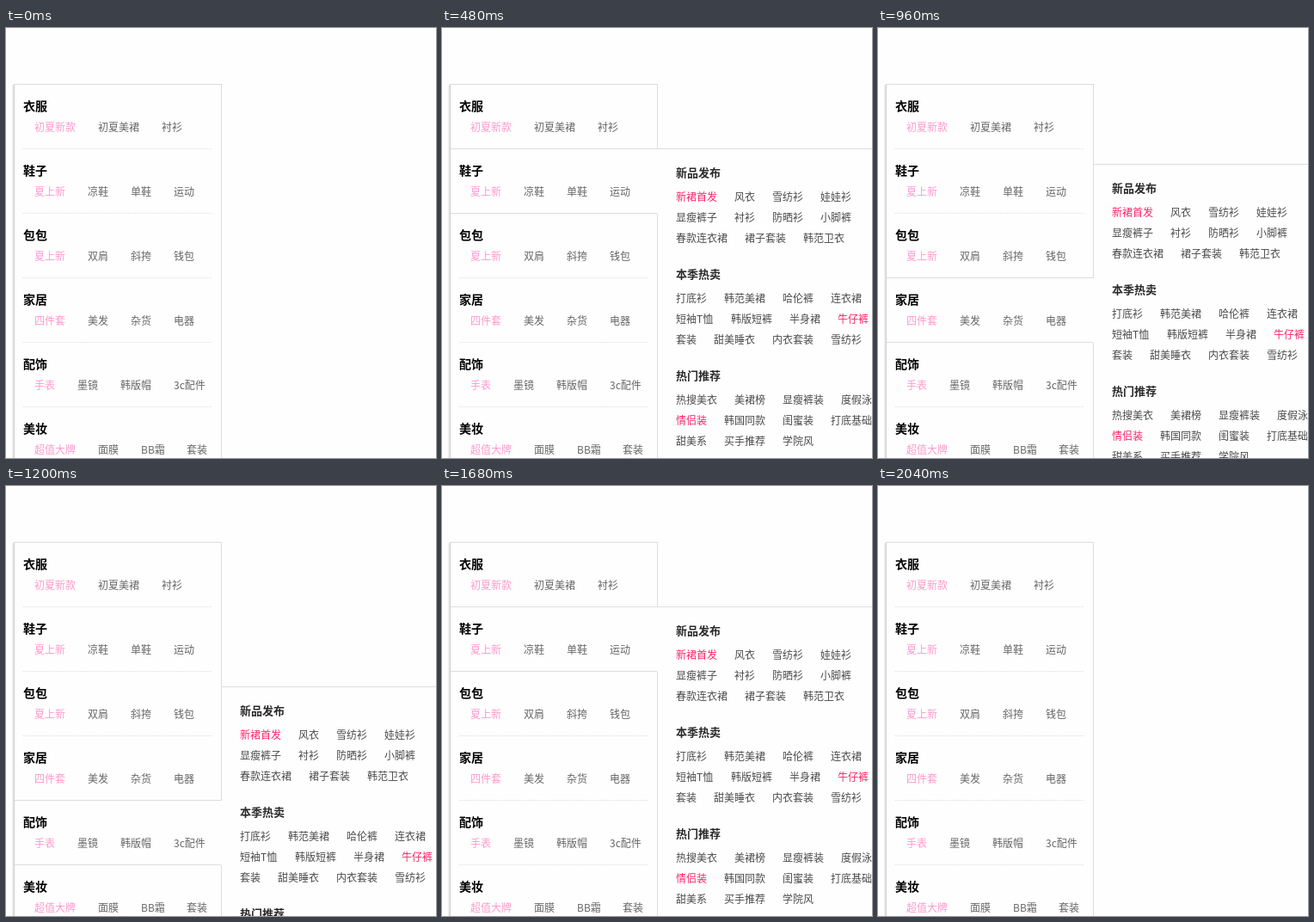
An HTML page for the animation above (2.58 s loop, 500x500 px).

```html
<!DOCTYPE html>
<html lang="zh-CN">
<head>
<meta charset="utf-8">
<title>分类菜单</title>
<style>
  html, body { margin: 0; width: 100%; height: 100%; overflow: hidden; background: #fefefe; }
  svg { display: block; width: 100%; height: 100%; }
  text { font-family: "Noto Sans CJK SC", "Noto Sans CJK", "Noto Sans", sans-serif; font-size: 12px; fill: #666; }
  .head { font-size: 14px; font-weight: 700; fill: #000; }
  .new { fill: #f9c; }
  .link { fill: #4a4a4a; }
  .hot { fill: #ff2468; }
  .group { font-size: 13px; font-weight: 700; fill: #2a2a2a; }
  line { stroke: #ddd; shape-rendering: crispEdges; }
  .dots { stroke-dasharray: 1 1; }
</style>
</head>
<body>
<svg id="stage" viewBox="0 0 500 500"></svg>
<script>
const TOP = 65, ROW = 75, LEFT = 9, RIGHT = 250, PANEL_H = 401;

const menu = [
  ['衣服', '初夏新款 初夏美裙 衬衫'],
  ['鞋子', '夏上新 凉鞋 单鞋 运动'],
  ['包包', '夏上新 双肩 斜挎 钱包'],
  ['家居', '四件套 美发 杂货 电器'],
  ['配饰', '手表 墨镜 韩版帽 3c配件'],
  ['美妆', '超值大牌 面膜 BB霜 套装']
];

// A star marks a highlighted link.
const groups = [
  ['新品发布', '*新裙首发 风衣 雪纺衫 娃娃衫', '显瘦裤子 衬衫 防晒衫 小脚裤', '春款连衣裙 裙子套装 韩范卫衣'],
  ['本季热卖', '打底衫 韩范美裙 哈伦裤 连衣裙', '短袖T恤 韩版短裤 半身裙 *牛仔裤', '套装 甜美睡衣 内衣套装 雪纺衫'],
  ['热门推荐', '热搜美衣 美裙榜 显瘦裤装 度假泳衣', '*情侣装 韩国同款 闺蜜装 打底基础', '甜美系 买手推荐 学院风']
];

const panelTops = [65, 140, 83, 158, 233];

// [start in ms, hovered row], -1 for none
const hovers = [[0, -1], [120, 0], [480, 1], [720, 2], [960, 3], [1200, 4],
                [1500, 3], [1560, 2], [1680, 1], [1800, 0], [2040, -1]];
const LOOP = 2580;

const stage = document.getElementById('stage');

function add(parent, tag, attrs, content) {
  const el = document.createElementNS('http://www.w3.org/2000/svg', tag);
  for (const key in attrs) el.setAttribute(key, attrs[key]);
  if (content) el.textContent = content;
  parent.appendChild(el);
  return el;
}

const hLine = (parent, x1, x2, y, attrs) =>
  add(parent, 'line', { x1, x2, y1: y + 0.5, y2: y + 0.5, ...attrs });
const vLine = (parent, x, y1, y2, attrs) =>
  add(parent, 'line', { x1: x + 0.5, x2: x + 0.5, y1, y2, ...attrs });
const label = (parent, x, y, cls, str) => add(parent, 'text', { x, y, class: cls }, str);
const textWidth = str => [...str].reduce((w, c) => w + (c < '\u0100' ? 7.5 : 12), 0);

function linkRow(parent, x, y, gap, words, classOf) {
  words.split(' ').forEach((word, i) => {
    const str = word.replace('*', '');
    label(parent, Math.round(x), y, classOf(word, i), str);
    x += textWidth(str) + gap;
  });
}

// Left edge with its soft shadow
vLine(stage, LEFT - 2, TOP + 2, 500, { style: 'stroke:#eee' });
vLine(stage, LEFT - 1, TOP + 1, 500, { style: 'stroke:#e4e4e4' });
vLine(stage, LEFT, TOP, 500, { style: 'stroke:#d0d0d0' });
hLine(stage, LEFT, RIGHT + 1, TOP);

const rows = menu.map(([head, words], i) => {
  const y = TOP + i * ROW;
  label(stage, 20, y + 31, 'head', head);
  linkRow(stage, 33, y + 55, 26, words, (w, k) => k ? '' : 'new');
  return {
    edge: vLine(stage, RIGHT, y + 1, y + ROW + 1),
    dots: hLine(stage, 20, 240, y + ROW, { class: 'dots' })
  };
});

const frame = add(stage, 'g');
hLine(frame, LEFT + 1, RIGHT, 0);
hLine(frame, LEFT + 1, RIGHT, ROW);

const panel = add(stage, 'g');
hLine(panel, RIGHT, 500, 0);
hLine(panel, RIGHT, 500, PANEL_H);
groups.forEach(([title, ...lines], g) => {
  const y = g * 118;
  label(panel, 272, y + 33, 'group', title);
  lines.forEach((words, i) =>
    linkRow(panel, 272, y + 61 + i * 24, 20, words, w => w[0] === '*' ? 'hot' : 'link'));
});

const show = (el, on) => el.setAttribute('visibility', on ? 'visible' : 'hidden');

function update(ms) {
  const t = ms % LOOP;
  const hover = hovers.filter(([start]) => start <= t).pop()[1];
  const open = hover >= 0;
  rows.forEach(({ edge, dots }, i) => {
    show(edge, i !== hover);
    show(dots, !open || (i !== hover && i !== hover - 1));
  });
  show(frame, open);
  show(panel, open);
  if (open) {
    frame.setAttribute('transform', `translate(0 ${TOP + hover * ROW})`);
    panel.setAttribute('transform', `translate(0 ${panelTops[hover]})`);
  }
}

const begin = performance.now();
function tick() {
  update(performance.now() - begin);
  requestAnimationFrame(tick);
}
tick();
</script>
</body>
</html>
```
